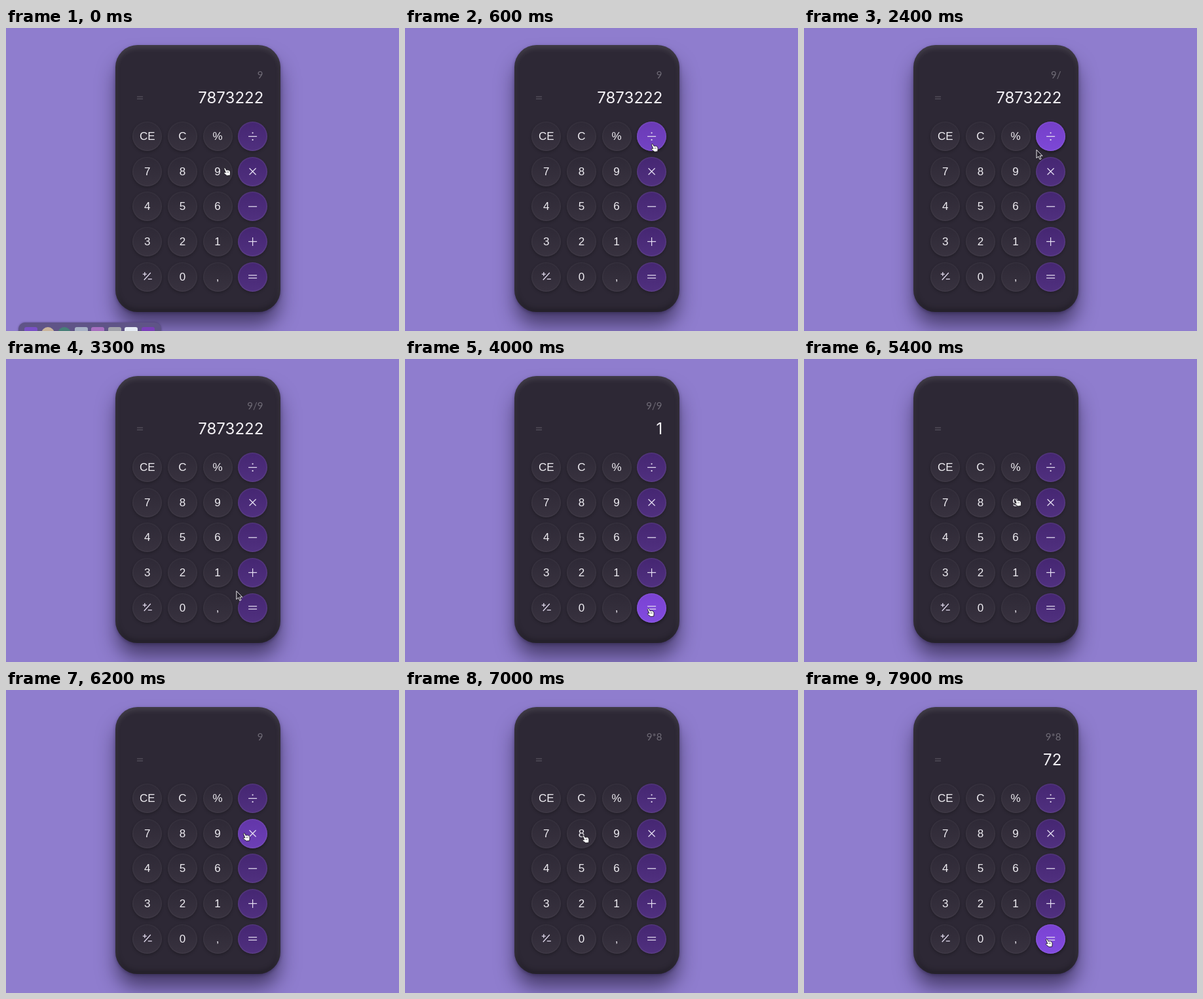
An HTML page for the animation above (8 s loop, 600 px wide and 463 px high).

```html
<!DOCTYPE html>
<html lang="en">
<head>
<meta charset="utf-8">
<title>Calculator</title>
<style>
  html, body { margin: 0; width: 100%; height: 100%; overflow: hidden; background: #8f7dce; }
  #stage { position: absolute; left: 0; top: 0; width: 600px; height: 463px; overflow: hidden; }
  #body {
    position: absolute; left: 167.4px; top: 25.6px; width: 252px; height: 408.8px;
    border-radius: 34px; background: #2d2835;
    box-shadow: 0 22px 30px -2px rgba(30, 22, 50, .64), 0 2px 5px rgba(30, 22, 50, .4),
      inset 0 4px 8px rgba(255, 255, 255, .13), inset 0 -4px 8px rgba(0, 0, 0, .3);
  }
  .key, .glow { position: absolute; width: 45px; height: 45px; border-radius: 50%; }
  .key {
    background: linear-gradient(#2e2936, #38323f);
    box-shadow: 0 2px 4px rgba(0, 0, 0, .26), inset 0 0 2px 1px rgba(255, 255, 255, .055);
  }
  .op { background: linear-gradient(#452672, #50307f); }
  .op, .glow { box-shadow: 0 2px 4px rgba(0, 0, 0, .26), inset 0 0 2px 1px rgba(255, 255, 255, .1); }
  .glow { left: 0; top: 0; opacity: 0; background: linear-gradient(#7a42d2, #824be0); }
  svg { position: absolute; left: 0; top: 0; }
  .label { font: 17px "Liberation Sans", Arial, sans-serif; fill: #efedf2; text-anchor: middle; }
  #history { font: 15px Lato, sans-serif; fill: #706c77; text-anchor: end; }
  #result { font: 24px Inter, sans-serif; fill: #f3f1f5; text-anchor: end; }
  #dock {
    position: absolute; left: 19px; top: 449.5px; width: 218px; height: 34px;
    border-radius: 10px; background: #5f5487; box-shadow: 0 0 3px rgba(40, 28, 70, .5);
  }
  #dock i { position: absolute; top: 7.5px; width: 20px; height: 20px; border-radius: 3px; }
  #dock i.round { border-radius: 50%; }
</style>
</head>
<body>
<div id="stage">
  <div id="body"></div>
  <div id="keys"></div>
  <div id="dock"></div>
  <svg width="600" height="463" viewBox="0 0 600 463" fill="none">
    <path d="M200 105h9M200 108.3h9" stroke="#625d69" stroke-width="1.1"/>
    <text id="history" x="392.5" y="77"></text>
    <text id="result" x="393.3" y="115"></text>
    <g id="labels"></g>
    <g id="cursor" stroke-linejoin="round">
      <path id="arrow" d="M0 0V12.7L2.9 10 5 14.6 7 13.7 5 9.2H9Z" fill="#25212b" stroke="#f4f2f6" stroke-width=".95"/>
      <g id="hand" transform="scale(.88)">
        <path d="M-1.4 .7Q-.8-1 .8-.3L3 3.7 4.1 2.8 5.6 3.6 6.8 3 8.3 4.2Q10.2 5.8 9.6 9L9.3 12.6 4 13.2 0 10.2Q-2.2 8.6-1.4 7.6 0 7 1.5 7.8Z" fill="#fff" stroke="#16131b"/>
        <path d="M4.2 5.8V8M6.2 5.8V8" stroke="#16131b" stroke-width=".7"/>
      </g>
    </g>
  </svg>
</div>
<script>
const LOOP = 8000, STEP = 100, FADE = 350, RADIUS = 22.5;
const FACES = [..."CE C % ÷ 7 8 9 × 4 5 6 − 3 2 1 + ± 0 , =".split(" ")];
const BAR = "M-6.5 0H6.5";
const dot = y => `M-.5 ${y}a.5.5 0 1 0 1 0a.5.5 0 1 0-1 0`;
const ICONS = {
  "÷": BAR + dot(-5.3) + dot(5.3),
  "×": "M-5-5L5 5M5-5L-5 5",
  "−": BAR,
  "+": BAR + "M0-6.5V6.5",
  "=": "M-6.5-2.2H6.5M-6.5 2.2H6.5",
  "±": "M-7-4H-1M-4-7V-1M5-6L-5 5M1 3.5H7"
};
const SIGNS = { "÷": "/", "×": "*" };
const MATH = { "/": (a, b) => a / b, "*": (a, b) => a * b };

// the pointer's visits: key, where on the key, and when
const visit = (face, dx, dy, arrive, click, leave) => ({ face, dx, dy, arrive, click, leave });
const VISITS = [
  visit("9", 11, -5, 0, 0, 50),
  visit("÷", 1, 12, 500, 2000, 2270),
  visit("9", 3, 4, 2700, 2800, 3000),
  visit("=", -5, 2, 3450, 3900, 4200),
  visit("C", 0, 10, 4650, 4900, 5050),
  visit("9", 2, 2, 5450, 5600, 5850),
  visit("×", -13, 0, 6150, 6500, 6550),
  visit("8", 3, 3, 6850, 7000, 7150),
  visit("=", -6, 1, 7500, 7800, LOOP)
];

const $ = id => document.getElementById(id);
const clamp = v => Math.max(0, Math.min(1, v));
const mix = (a, b, k) => a + (b - a) * k;
const glows = {}, centers = {};

function add(parent, tag, cls) {
  const el = document.createElement(tag);
  el.className = cls;
  return parent.appendChild(el);
}

function addSvg(name, attrs) {
  const el = document.createElementNS("http://www.w3.org/2000/svg", name);
  for (const k in attrs) el.setAttribute(k, attrs[k]);
  return $("labels").appendChild(el);
}

FACES.forEach((face, i) => {
  const x = 215.8 + 53.6 * (i % 4), y = 165.6 + 53.6 * (i >> 2), op = i % 4 === 3;
  const key = add($("keys"), "div", op ? "key op" : "key");
  key.style.left = x - RADIUS + "px";
  key.style.top = y - RADIUS + "px";
  centers[face] = [x, y];
  if (op) glows[face] = add(key, "div", "glow");
  if (ICONS[face]) {
    addSvg("path", { d: ICONS[face], transform: `translate(${x} ${y})`, stroke: "#e3dcf0", "stroke-width": 1.25 });
  } else {
    addSvg("text", { x, y: Math.floor(y + 6), class: "label" }).textContent = face;
  }
});

"#7950c6 #cab59c #477f78 #a8b2c6 #a76fc0 #a4a5ac #e6ecf5 #7a3fba".split(" ").forEach((color, i) => {
  const icon = add($("dock"), "i", i === 1 || i === 2 ? "round" : "");
  icon.style.left = 9 + i * 25.5 + "px";
  icon.style.background = color;
});

const spot = v => [centers[v.face][0] + v.dx, centers[v.face][1] + v.dy];

// between two keys the longer axis runs ahead of the shorter one
function pointer(t) {
  const n = VISITS.findIndex(v => t < v.leave);
  const b = spot(VISITS[n]);
  if (t >= VISITS[n].arrive) return b;
  const from = VISITS[n - 1], a = spot(from);
  const k = (t - from.leave) / (VISITS[n].arrive - from.leave);
  const lead = 1 - (1 - k) ** 1.6, lag = k ** 1.4;
  const wide = Math.abs(b[0] - a[0]) > Math.abs(b[1] - a[1]);
  return [mix(a[0], b[0], wide ? lead : lag), mix(a[1], b[1], wide ? lag : lead)];
}

function compute(t) {
  let history = "", result = "7873222";
  for (const { face, click } of VISITS) {
    if (click > t) break;
    if (face === "C") history = result = "";
    else if (face === "=") {
      const [, a, sign, b] = history.match(/(\d+)(\D)(\d+)/);
      result = String(MATH[sign](+a, +b));
    } else history += SIGNS[face] || face;
  }
  return { history, result };
}

function glow(face, t) {
  const levels = VISITS.filter(v => v.face === face)
    .map(v => clamp((t - v.arrive + 150) / FADE) - clamp((t - v.leave - 100) / FADE));
  return Math.max(0, ...levels);
}

function draw(t) {
  for (const face in glows) glows[face].style.opacity = glow(face, t);
  const { history, result } = compute(t);
  $("history").textContent = history;
  $("result").textContent = result;

  const [x, y] = pointer(t);
  const over = Object.values(centers).some(c => Math.hypot(x - c[0], y - c[1]) < RADIUS);
  $("cursor").setAttribute("transform", `translate(${x} ${y})`);
  $("hand").style.display = over ? "" : "none";
  $("arrow").style.display = over ? "none" : "";

  $("dock").style.transform = `translateY(${clamp(t / 300) ** 2 * 18}px)`;
}

const start = performance.now();
function tick(now) {
  const t = Math.max(0, now - start) % LOOP;
  draw(Math.floor(t / STEP) * STEP);
  requestAnimationFrame(tick);
}
draw(0);
requestAnimationFrame(tick);
</script>
</body>
</html>
```
